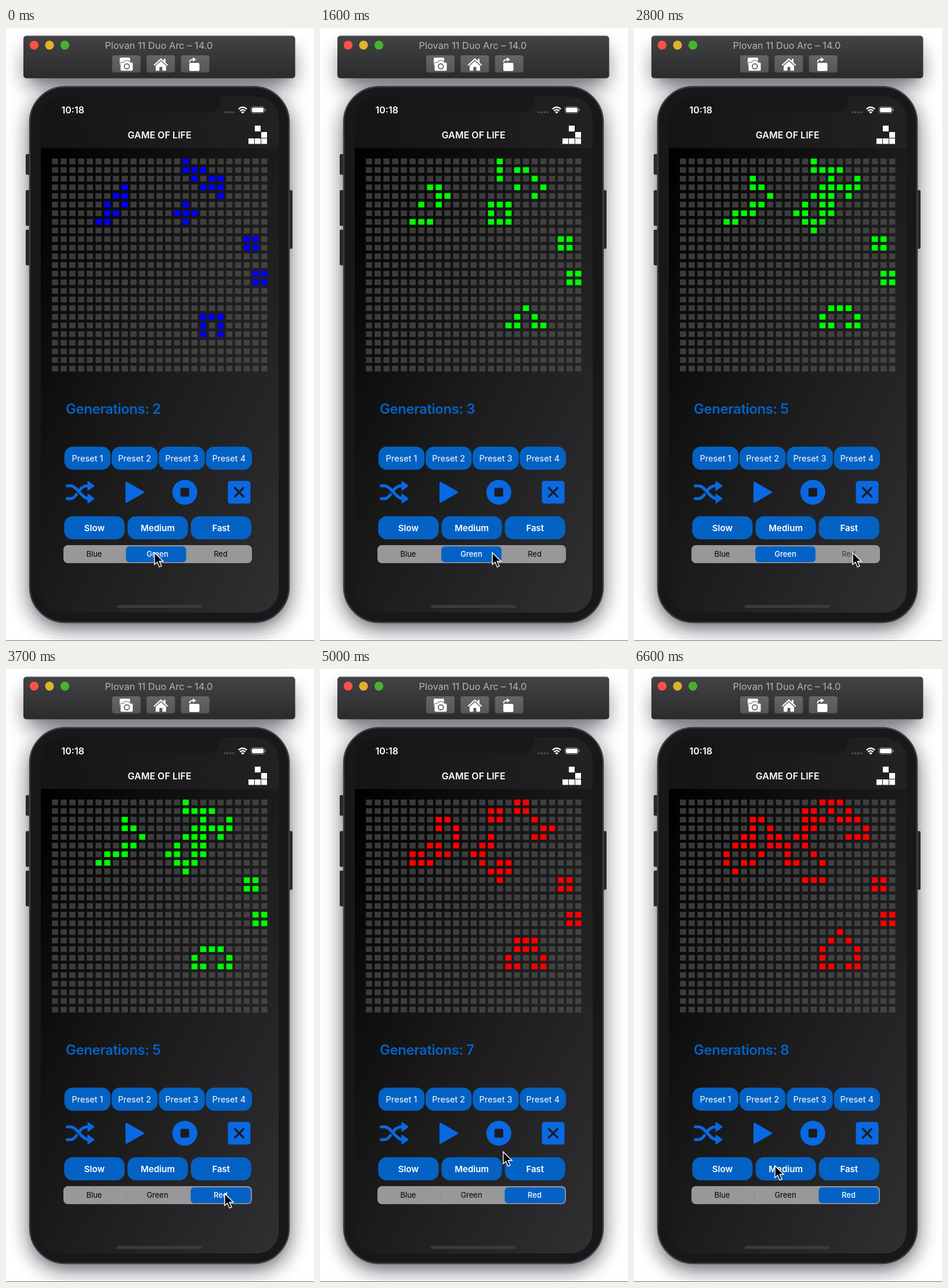
Recreate the animation shown at these times as an HTML page. Size 531 px wide and 1055 px high, loop 6700 ms.

```html
<!DOCTYPE html>
<html lang="en">
<head>
<meta charset="utf-8">
<title>Game of Life</title>
<style>
  html, body { margin: 0; width: 100%; height: 100%; overflow: hidden; background: #fff; }
  svg { display: block; width: 100%; height: 100%; }
  text { font-family: Inter, Roboto, sans-serif; fill: #fff; }
  .mid { text-anchor: middle; }
  .bold { font-weight: 600; }
  .blue { fill: #0462c4; }
  .icon { fill: #0969e2; }
</style>
</head>
<body>
<svg viewBox="0 0 531 1055">
  <defs>
    <linearGradient id="bar" x2="0" y2="1">
      <stop stop-color="#434244"/><stop offset="1" stop-color="#2b2a2c"/>
    </linearGradient>
    <linearGradient id="key" x2="0" y2="1">
      <stop stop-color="#666567"/><stop offset="1" stop-color="#565557"/>
    </linearGradient>
    <linearGradient id="nav">
      <stop stop-color="#141315"/><stop offset="1" stop-color="#222123"/>
    </linearGradient>
    <linearGradient id="view" x2="1" y2="1">
      <stop stop-color="#000"/><stop offset=".5" stop-color="#1b1b1c"/><stop offset="1" stop-color="#302f32"/>
    </linearGradient>
    <clipPath id="screen"><rect x="60" y="118" width="410" height="888" rx="38"/></clipPath>
    <filter id="blur" x="-30%" y="-20%" width="160%" height="140%"><feGaussianBlur stdDeviation="17"/></filter>
  </defs>

  <!-- Shadow -->
  <g filter="url(#blur)" fill="#1a1520" opacity=".68">
    <rect x="36" y="38" width="457" height="60"/>
    <rect x="40" y="112" width="449" height="922" rx="62"/>
  </g>
  <rect y="1054" width="531" height="1" fill="#777"/>

  <!-- Window bar -->
  <rect x="30" y="13.5" width="468.5" height="73" rx="5" fill="url(#bar)"/>
  <path d="M34 14H495" stroke="#5b5a5c"/>
  <circle cx="48.5" cy="29.5" r="7.7" fill="#fe5049"/>
  <circle cx="75" cy="29.5" r="7.7" fill="#dfb32a"/>
  <circle cx="101.5" cy="29.5" r="7.7" fill="#45b32e"/>
  <text class="mid" x="263.5" y="35.5" font-size="16.4" style="fill:#b5b4b6">Plovan 11 Duo Arc – 14.0</text>
  <g fill="url(#key)">
    <rect x="183" y="47" width="49" height="29.5" rx="4"/>
    <rect x="242.3" y="47" width="49" height="29.5" rx="4"/>
    <rect x="301.6" y="47" width="49" height="29.5" rx="4"/>
  </g>
  <g fill="#fff">
    <rect x="196" y="51" width="18" height="14" rx="2"/>
    <path d="M199 59h4l2-3h7l2 3h3q2 0 2 2v11q0 2-2 2h-18q-2 0-2-2v-11q0-2 2-2z" stroke="#606061"/>
    <circle cx="208.3" cy="66" r="4.4" fill="none" stroke="#59585a" stroke-width="1.6"/>
    <path d="M254.5 63.5 267 52l5 4.5V53h3v6.5l4.500 4-1.500 1.500-11-10-11 10z"/>
    <path d="M258 65l9-8 9 8v8.500h-6.500V67h-5v6.500H258z"/>
    <rect x="316" y="60" width="17.500" height="14" rx="2"/>
    <path d="M316.500 59q0-5 7-5" fill="none" stroke="#fff" stroke-width="2"/>
    <path d="M322 50.500l6 3.700-6 3.700z"/>
  </g>

  <!-- Phone -->
  <g fill="#29282b">
    <rect x="34" y="217" width="9" height="35.500" rx="2"/>
    <rect x="34" y="279" width="9" height="61.500" rx="2"/>
    <rect x="34" y="347" width="9" height="61.500" rx="2"/>
    <rect x="485" y="279" width="9" height="101" rx="2"/>
  </g>
  <rect x="41" y="101" width="447" height="922" rx="61" fill="#18171a" stroke="#3d3c3f" stroke-width="2.500"/>
  <g clip-path="url(#screen)">
    <rect x="60" y="206" width="410" height="800" fill="url(#view)"/>
    <rect x="60" y="118" width="410" height="88.500" fill="url(#nav)"/>
    <path d="M150 118H372q-4 2-4 8 0 19-19 19H173q-19 0-19-19 0-6-4-8z" fill="#18171a"/>
  </g>

  <!-- Status and title -->
  <text class="bold" x="95.500" y="147" font-size="16">10:18</text>
  <g fill="#535255">
    <circle cx="377" cy="145" r="1.800"/><circle cx="382" cy="145" r="1.800"/>
    <circle cx="387" cy="145" r="1.800"/><circle cx="392" cy="145" r="1.800"/>
  </g>
  <g fill="none" stroke="#fff" stroke-width="2.300">
    <path d="M400.700 139.500q7.300-6.500 14.600 0M403.300 142.600q4.700-4 9.400 0"/>
  </g>
  <path d="M405 144.600q3-2.200 6 0l-3 3z" fill="#fff"/>
  <rect x="422.500" y="135.500" width="23" height="11" rx="3.500" fill="none" stroke="#8b8a8d"/>
  <rect x="424" y="137" width="20" height="8" rx="2.200" fill="#fff"/>
  <path d="M447 139.500q1.500 1.500 0 3z" fill="#8b8a8d" stroke="#8b8a8d"/>
  <text class="mid bold" x="264.700" y="190" font-size="16">GAME OF LIFE</text>
  <path d="M429 168h10v10h-10zM440 179h10v10h-10zM418 190h10v9.500h-10zM429 190h10v9.500h-10zM440 190h10v9.500h-10z" fill="#fff"/>

  <g id="cells"></g>
  <text id="count" class="blue bold" x="103" y="663.500" font-size="24" letter-spacing="-.45"></text>
  <g id="buttons"></g>

  <!-- Control icons -->
  <g class="icon">
    <g fill="none" stroke="#0969e2" stroke-width="5" stroke-linecap="round">
      <path d="M105.500 788h6c11 0 19 22 31 22M105.500 810h6c4 0 7-3 10-7M127 795q6-7 13-7h2"/>
    </g>
    <path d="M140.500 780.500q0-1.500 1.500-.5l10 7q1.200 1 0 2l-10 7q-1.500 1-1.500-.5zM140.500 802.500q0-1.500 1.500-.5l10 7q1.200 1 0 2l-10 7q-1.500 1-1.500-.5z"/>
    <path d="M206 783q0-3 3-1.500l28 16q2.500 1.500 0 3l-28 16q-3 1.500-3-1.500z"/>
    <circle cx="308.300" cy="799" r="21.500"/>
    <rect x="382.500" y="779.500" width="39" height="39" rx="4.500"/>
  </g>
  <rect x="300.800" y="791.500" width="15" height="15" rx="2" fill="#1c1c1f"/>
  <path d="M394.500 791.500l15 15m0-15l-15 15" stroke="#1c1c1f" stroke-width="3.400" stroke-linecap="round"/>

  <!-- Colour picker -->
  <rect x="99" y="890" width="325" height="31" rx="7.500" fill="#98979a"/>
  <path id="divider" d="M207 899v14" stroke="#89888b"/>
  <rect id="pill" y="892" width="104" height="27.500" rx="6" fill="#0462c6" stroke="#77839a" stroke-width=".6"/>
  <g id="labels"></g>
  <rect x="191" y="993" width="146" height="5" rx="2.500" fill="#3b3a3d"/>

  <path id="cursor" d="M0 0V20.500L4.700 16.200 8.400 24.700 12 23.200 8.300 14.800H15z" fill="#000" stroke="#fff" stroke-width="1.400"/>
</svg>
<script>
const LOOP = 6700, SIZE = 25, FIRST_GENERATION = 2;
const byId = id => document.getElementById(id);

function add(parent, tag, attrs, content = '') {
  const node = document.createElementNS('http://www.w3.org/2000/svg', tag);
  for (const name in attrs) node.setAttribute(name, attrs[name]);
  node.textContent = content;
  return parent.appendChild(node);
}

function button(x, y, width, height, label, size, weight) {
  add(byId('buttons'), 'rect', { x, y, width, height, rx: 14.5, class: 'blue' });
  add(byId('buttons'), 'text', {
    x: x + width / 2, y: y + height / 2 + size * .36, class: 'mid', 'font-size': size, 'font-weight': weight
  }, label);
}
for (let i = 0; i < 4; i++) button(100.7 + i * 81.3, 720.5, 79.5, 39.7, `Preset ${i + 1}`, 14.6, 400);
['Slow', 'Medium', 'Fast'].forEach((label, i) => button(100.3 + i * 109.2, 840.3, 104.2, 39.7, label, 15, 600));

const labels = ['Blue', 'Green', 'Red'].map((label, i) =>
  add(byId('labels'), 'text', { x: 152 + i * 109, y: 910.3, class: 'mid', 'font-size': 13 }, label));

const cells = Array.from({ length: SIZE * SIZE }, (_, i) => add(byId('cells'), 'rect', {
  x: 79.2 + i % SIZE * 15.03, y: 224.7 + Math.floor(i / SIZE) * 14.86, width: 10.6, height: 9.8
}));

// Live cells as "row:columns".
const seed = '0:15 1:15,16,17 2:16,18,19 3:8,17,18,19 4:7,8,19 5:6,8,15 6:6,7,14,15,16 ' +
  '7:5,6,15 9:22,23 10:22,23 13:23,24 14:23,24 18:17,18,19 19:17,19 20:17,19';

function parse(pattern) {
  const grid = Array(SIZE * SIZE).fill(false);
  for (const line of pattern.split(' ')) {
    const [row, columns] = line.split(':');
    for (const column of columns.split(',')) grid[row * SIZE + +column] = true;
  }
  return grid;
}

function evolve(grid) {
  return grid.map((alive, i) => {
    const x = i % SIZE, y = Math.floor(i / SIZE);
    let neighbours = 0;
    for (let dy = -1; dy <= 1; dy++) for (let dx = -1; dx <= 1; dx++) {
      const inside = x + dx >= 0 && x + dx < SIZE && y + dy >= 0 && y + dy < SIZE;
      if ((dx || dy) && inside && grid[i + dy * SIZE + dx]) neighbours++;
    }
    return neighbours === 3 || alive && neighbours === 2;
  });
}

const generations = [parse(seed)];
while (generations.length < 7) generations.push(evolve(generations[generations.length - 1]));

// Keys are [time, ...values], joined by straight moves.
const cursorKeys = [
  [0, 256, 903], [1400, 256, 903], [1600, 297, 903], [2300, 377, 903], [4900, 377, 903],
  [5000, 316, 831], [5400, 243, 837], [5800, 243, 837], [6400, 243, 855], [LOOP, 243, 855]
];
const pillKeys = [[0, 206.7], [200, 209], [3000, 209], [3100, 260], [3200, 301], [3300, 315], [3400, 318.3], [LOOP, 318.3]];

function valuesAt(keys, t) {
  const next = Math.max(1, keys.findIndex(key => key[0] > t));
  const [a, b] = [keys[next - 1], keys[next]];
  const k = (t - a[0]) / (b[0] - a[0]);
  return a.slice(1).map((value, i) => value + (b[i + 1] - value) * k);
}

let shownStep = -1;
function showGeneration(step) {
  if (step === shownStep) return;
  shownStep = step;
  const color = step < 1 ? '#00f' : step < 4 ? '#0f0' : '#f00';
  generations[step].forEach((alive, i) => {
    cells[i].setAttribute('fill', alive ? color : '#555');
    cells[i].setAttribute('opacity', alive ? 1 : .65);
  });
  byId('count').textContent = `Generations: ${FIRST_GENERATION + step}`;
}

function draw(now) {
  const t = now % LOOP;
  showGeneration(Math.floor((t + 205) / 1000));

  const selected = t < 3000 ? 1 : 2;
  byId('pill').setAttribute('x', valuesAt(pillKeys, t)[0]);
  byId('divider').setAttribute('opacity', selected === 2 ? 1 : 0);
  labels.forEach((label, i) => {
    label.style.fill = i === selected ? '#fff' : '#000';
    label.style.fontWeight = i === selected ? 500 : 400;
  });
  labels[2].style.opacity = t >= 2700 && t < 3000 ? .6 : 1;

  byId('cursor').setAttribute('transform', `translate(${valuesAt(cursorKeys, t)})`);
  requestAnimationFrame(draw);
}
requestAnimationFrame(draw);
</script>
</body>
</html>
```
